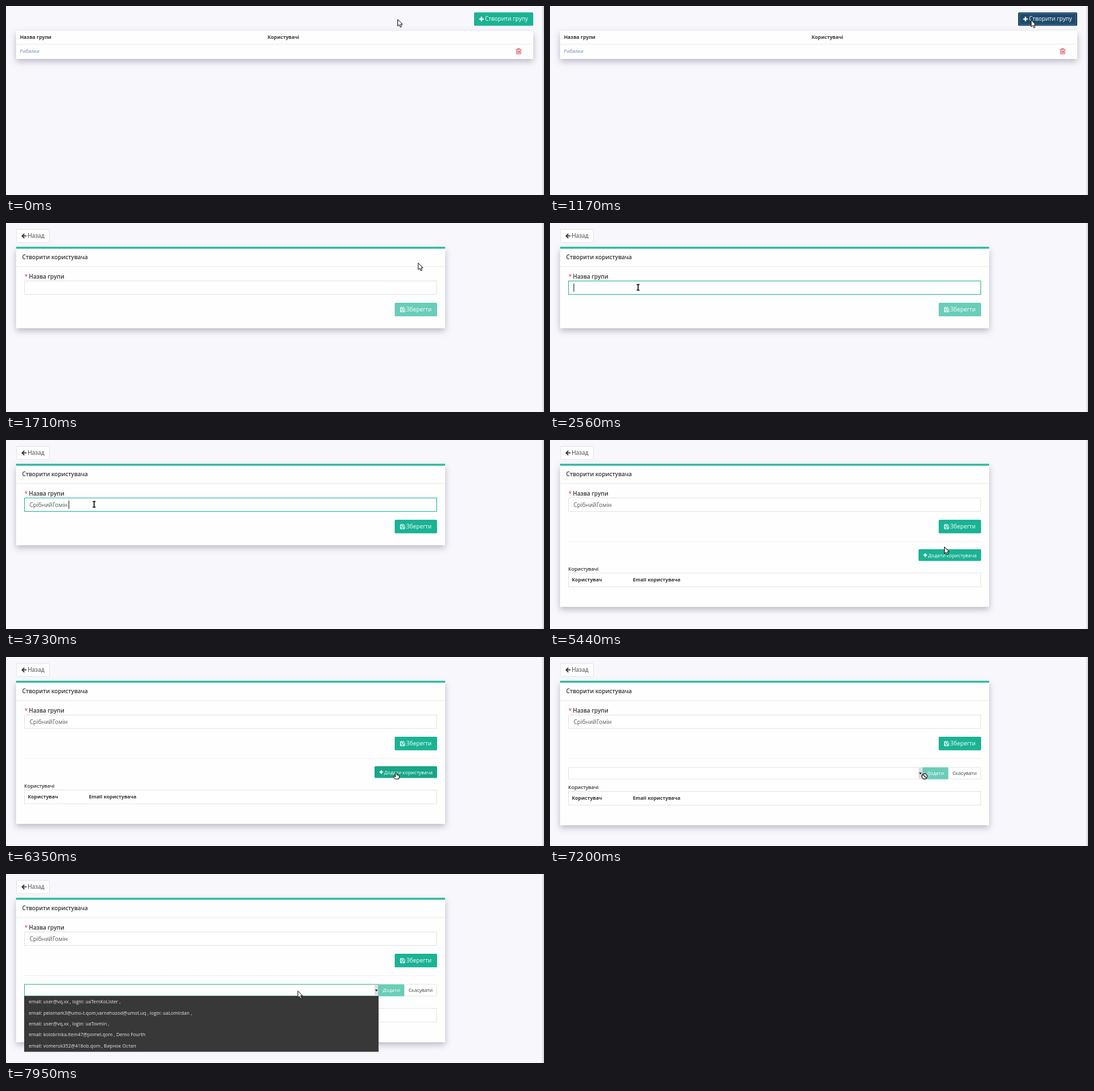
Animation, 800 px wide and 282 px high, one loop 8 s. Source, as an HTML page:

```html
<!DOCTYPE html>
<html lang="uk">
<head>
<meta charset="utf-8">
<title>Групи</title>
<style>
  html, body { margin: 0; width: 100%; height: 100%; overflow: hidden; background: #f8f7fc; }
  svg { display: block; width: 800px; height: 282px; font-family: "Open Sans", "Noto Sans", sans-serif; }
  text { white-space: pre; }
  .card { fill: #fefefe; filter: drop-shadow(0 4px 5px rgba(45, 45, 75, .3)); }
  .box { fill: #fff; stroke: #e5e6e9; }
  .focus { stroke: #3cb99f; }
  .rule { stroke: #ebebee; fill: none; }
  .big { font-size: 8.5px; }
  .mid { font-size: 7.3px; }
  .th { font-size: 7.25px; font-weight: 700; fill: #333; }
  .semi { font-weight: 600; fill: #333; }
  .dark { fill: #3d3f42; }
  .white { fill: #fff; }
  .item { font-size: 7px; fill: #e6e6e6; }
</style>
</head>
<body>
<svg id="stage" viewBox="0 0 800 282"></svg>
<script>
const LOOP = 8000;
const GREEN = '#1ab394', GREEN_HOVER = '#18a689', PRESSED = '#1f4a6d';

const text = (x, y, cls, s) => `<text x="${x}" y="${y}" class="${cls}">${s}</text>`;
const rect = (x, y, w, h, attrs) => `<rect x="${x}" y="${y}" width="${w}" height="${h}" ${attrs}/>`;
const group = (id, body) => `<g id="${id}">${body}</g>`;
const at = (x, y, body) => `<g transform="translate(${x} ${y})">${body}</g>`;
const plus = (x, y, r) =>
  `<path d="M${x - r} ${y}h${2 * r}M${x} ${y - r}v${2 * r}" stroke="#fff" stroke-width="${r * .62}"/>`;

const backButton = rect(15.5, 9.5, 49, 19.5, 'rx="1.5" class="box"') +
  '<path d="M30.5 19.3H24.5M27.3 16L24 19.3L27.3 22.6" fill="none" stroke="#333" stroke-width="1.6"/>' +
  text(32.3, 22.4, 'big dark', 'Назад');

const trash = at(758, 63,
  '<path d="M.3 2H8.3M2.8 1.8V.6H5.8V1.8M1.3 2.3V8.4H7.3V2.3M3 3.8V7M4.3 3.8V7M5.6 3.8V7" ' +
  'fill="none" stroke="#e0485c" stroke-width=".95"/>');

const floppy = at(586, 125.6,
  '<path d="M.5.5H5.3L6.9 2V7H.5zM2 .6V2.7H4.7V.6M1.9 6.9V4.5H5.5V6.9" ' +
  'fill="none" stroke="#fff" stroke-width=".9"/>');

const list =
  rect(15, 37, 769, 42, 'class="card"') +
  '<path d="M15 57H784" class="rule"/>' +
  text(20.7, 48.7, 'th', 'Назва групи') +
  text(389, 48.7, 'th', 'Користувачі') +
  '<text x="20.7" y="70" font-size="7.05" fill="#628ba5">Рибалки</text>' + trash +
  rect(696, 9.5, 88, 20, 'id="create" rx="1.5"') +
  rect(698.5, 11.5, 83, 16, 'id="dots" fill="none" stroke="#fff" stroke-opacity=".28" stroke-dasharray="1 1"') +
  plus(707, 19.4, 3.3) + text(712.2, 22.4, 'big white', 'Створити групу');

const usersTable = group('users',
  text(27, 194.6, 'mid semi', 'Користувачі') +
  rect(27.5, 198.5, 613, 20.5, 'class="box"') +
  text(32.5, 211.4, 'th', 'Користувач') +
  text(123.3, 211.4, 'th', 'Email користувача'));

const addButton = group('addButton',
  rect(548, 163, 93, 17.5, 'id="add" rx="1.5"') + plus(558, 171.7, 2.7) +
  text(562.3, 174.5, 'mid white', 'Додати користувача'));

const picker = group('picker',
  rect(27.5, 164.7, 526, 17.3, 'id="select" class="box"') +
  rect(548, 165.2, 5.5, 16.3, 'fill="#dfdfe2"') +
  '<path d="M548.8 172.4h4l-2 2.8z" fill="#111"/>' +
  group('disabledAdd', rect(554, 164.5, 38, 18, `fill="${GREEN}"`) + text(560.3, 176.2, 'mid white', 'Додати')) +
  rect(592.5, 164.7, 48, 17.3, 'rx="1" class="box"') +
  text(598.5, 176.2, 'mid dark', 'Скасувати'));

const form =
  rect(15, 36, 638, 121, 'id="card" class="card"') +
  rect(15, 35.6, 638, 2.7, 'fill="#20b89a"') +
  '<path d="M15 65H653" class="rule"/>' +
  text(24, 54.2, 'big semi', 'Створити користувача') +
  text(27.5, 83.2, 'big" fill="#e33', '*') +
  text(34, 83, 'big semi', 'Назва групи') +
  rect(27.5, 86.5, 613, 20, 'id="input" class="box"') +
  '<text id="value" x="35" y="99.7" class="big" fill="#55585a">СрібнийГомін</text>' +
  rect(35, 90.5, 1, 12, 'id="caret" fill="#333"') +
  group('saveButton', rect(578, 119, 63, 20.3, 'id="save" rx="1.5"') + floppy +
    text(595.2, 132.2, 'big white', 'Зберегти')) +
  group('members',
    '<path d="M27 151.5H641" class="rule" stroke-dasharray="1.5 1"/>' + usersTable + addButton + picker) +
  backButton;

const options = [
  'email: user@vq.xx , login: uaTemKoLister ,',
  'email: pelomark3@umo-t.qom,varnehozod@umot.uq , login: uaLomirdan ,',
  'email: user@vq.xx , login: uaTovmin ,',
  'email: kolobrinka.item47@pomel.qom , Demo Fourth',
  'email: vomeruk352@418ob.qom , Вирнок Остап'
];
const menu = rect(27, 182, 527, 83.3, 'fill="#383838"') +
  options.map((s, i) => text(34, 193.3 + i * 16.3, 'item', s)).join('');

const beam = 'd="M-2.2 -4.2H2.2M0 -4.2V4.2M-2.2 4.2H2.2" fill="none"';
const pointers = {
  arrow: '<path d="M0 0V10L2.3 7.9L3.9 11.6L5.7 10.8L4.1 7.3H7.1z" fill="#fff" stroke="#111" stroke-width=".95"/>',
  hand: '<path d="M-1 1Q0 -.7 1 1V3.8L4 4.5Q5.2 5 4.9 6.6L4 10H-1.6L-4 6.7Q-3.6 5 -2 6.2L-1 7z" ' +
    'fill="#fff" stroke="#111" stroke-width="1"/>',
  beam: `<path ${beam} stroke="#fff" stroke-width="3"/><path ${beam} stroke="#222" stroke-width="1.6"/>`,
  no: '<circle r="5.3" fill="#fff"/><circle r="4.1" fill="#fff" stroke="#333" stroke-width="1.5"/>' +
    '<path d="M-2.8 -2.8L2.8 2.8" stroke="#333" stroke-width="1.5"/>'
};

document.getElementById('stage').innerHTML =
  rect(0, 0, 800, 282, 'fill="#f8f7fc"') +
  rect(797.6, 0, 2.4, 282, 'fill="#dcdbe1"') +
  group('list', list) + group('form', form) + group('menu', menu) +
  group('pointer', Object.entries(pointers).map(([k, body]) => group(k, body)).join(''));

// time, x, y of the pointer's hot spot
const path = [
  [0, 582.5, 20], [50, 582.5, 20], [850, 715.5, 21], [1230, 715.5, 21],
  [1740, 612, 60], [2400, 131, 96], [3730, 131, 96], [4480, 602, 132],
  [4990, 602, 132], [5440, 586.5, 159.5], [6100, 580, 172], [6600, 580, 172],
  [7150, 557, 178], [7200, 557, 178], [7570, 434, 174.5], [LOOP, 434, 174.5]
];
const kinds = [
  [0, 'arrow'], [2170, 'beam'], [4010, 'arrow'], [4375, 'hand'], [5150, 'arrow'],
  [5680, 'hand'], [6400, 'no'], [7245, 'arrow']
];

const $ = id => document.getElementById(id);
const show = (id, on) => { $(id).style.display = on ? '' : 'none'; };
const fill = (id, color) => $(id).setAttribute('fill', color);
const within = (t, a, b) => t >= a && t < b;
const clamp = v => Math.min(1, Math.max(0, v));

function pointerAt(t) {
  const i = path.findIndex(p => p[0] > t);
  const [t0, x0, y0] = path[i - 1], [t1, x1, y1] = path[i];
  const u = (t - t0) / (t1 - t0), e = u * u * (3 - 2 * u);
  return [x0 + (x1 - x0) * e, y0 + (y1 - y0) * e];
}

function caretOn(t) {
  const start = t < 3360 ? 2550 : 3360;
  return within(t, 2550, 4630) && Math.floor((t - start) / 530) % 2 === 0;
}

function draw(t) {
  const onForm = t >= 1230, saved = t >= 4900, picking = t >= 6400, open = t >= 7790;
  show('list', !onForm);
  show('form', onForm);
  show('menu', open);
  show('members', saved);
  show('addButton', !picking);
  show('picker', picking);

  const pressed = t >= 1060;
  fill('create', pressed ? PRESSED : t >= 650 ? GREEN_HOVER : GREEN);
  show('dots', pressed);

  $('card').setAttribute('height', picking ? 215 : saved ? 213 : 121);
  $('users').setAttribute('transform', `translate(0 ${picking ? 2 : 0})`);
  $('input').classList.toggle('focus', within(t, 2550, 4630));
  $('select').classList.toggle('focus', t >= 7730);
  show('value', t >= 3360);
  show('caret', caretOn(t));
  $('caret').setAttribute('x', t < 3360 ? 35 : 93);
  $('saveButton').setAttribute('opacity', .65 + .35 * clamp((t - 3360) / 200));
  $('disabledAdd').setAttribute('opacity', .65);
  fill('save', within(t, 4375, 5150) ? GREEN_HOVER : GREEN);
  fill('add', t >= 5680 ? GREEN_HOVER : GREEN);

  const [x, y] = pointerAt(t);
  $('pointer').setAttribute('transform', `translate(${x.toFixed(2)} ${y.toFixed(2)})`);
  const kind = kinds.filter(k => k[0] <= t).pop()[1];
  Object.keys(pointers).forEach(k => show(k, k === kind));
}

const begin = performance.now();
function tick() {
  draw((performance.now() - begin) % LOOP);
  requestAnimationFrame(tick);
}
tick();
</script>
</body>
</html>
```
